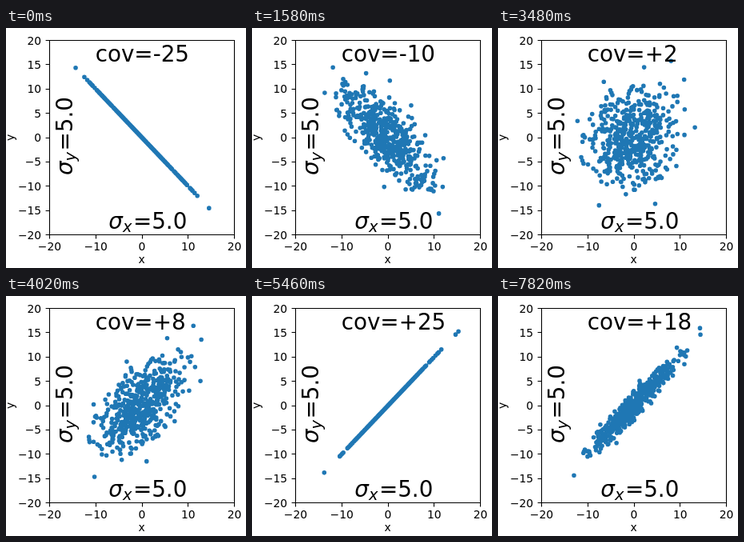
Recreate the animation shown at these times as an HTML page. Size 300 by 300 pixels, loop 8000 ms.

```html
<!DOCTYPE html>
<html lang="en">
<head>
<meta charset="utf-8">
<title>Covariance</title>
<style>
  html, body { margin: 0; width: 100%; height: 100%; overflow: hidden; background: #fff; }
  svg { display: block; width: 100vw; height: 100vh; }
  text { font-family: "DejaVu Sans", sans-serif; font-size: 13.89px; fill: #000; }
  .big text { font-size: 27.78px; }
  .big .sigma { font-style: oblique; }
  .big .sub { font-style: oblique; font-size: 19.45px; }
  .axes { fill: none; stroke: #000; stroke-width: 1.1; }
  #dots { fill: none; stroke: #1f77b4; stroke-width: 5.6; stroke-linecap: round; }
</style>
</head>
<body>
<svg viewBox="0 0 300 300">
  <path id="dots"/>
  <path id="frame" class="axes"/>
  <g id="labels"></g>
  <text x="169.7" y="294" text-anchor="middle">x</text>
  <text transform="translate(9.5 137) rotate(-90)" text-anchor="middle">y</text>
  <g class="big">
    <text id="cov" x="111.7" y="42"></text>
    <g id="sx" transform="translate(128.3 251)"></g>
    <g id="sy" transform="translate(83 184) rotate(-90)"></g>
  </g>
</svg>
<script>
const $ = id => document.getElementById(id);
const LOOP = 8000, STEP = 180, STEPS = 12;
const COUNT = 500, SPREAD = 4.85, INNER = 0.955;
const LEFT = 54.5, RIGHT = 285.5, TOP = 15.5, BOTTOM = 258.5, TICK = 4.9;
const px = x => LEFT + (x + 20) * (RIGHT - LEFT) / 40;
const py = y => BOTTOM - (y + 20) * (BOTTOM - TOP) / 40;
const snap = v => Math.floor(v) + 0.5;

// Axes
let frame = `M${LEFT} ${TOP}H${RIGHT}V${BOTTOM}H${LEFT}Z`, labels = "";
const number = v => String(v).replace("-", "\u2212");
for (let v = -20; v <= 20; v += 5) {
  frame += `M${LEFT} ${snap(py(v))}h${-TICK}`;
  labels += `<text x="44.2" y="${py(v) + 5}" text-anchor="end">${number(v)}</text>`;
  if (v % 10 === 0) {
    frame += `M${snap(px(v))} ${BOTTOM}v${TICK}`;
    labels += `<text x="${px(v)}" y="278.3" text-anchor="middle">${number(v)}</text>`;
  }
}
$("frame").setAttribute("d", frame);
$("labels").innerHTML = labels;

const sigma = sub => `<text class="sigma">σ</text><text class="sub" x="17.6" y="4.4">${sub}</text><text x="30.6">=5.0</text>`;
$("sx").innerHTML = sigma("x");
$("sy").innerHTML = sigma("y");

// Uncorrelated cloud: the farthest points, then a seeded Gaussian core
const points = [
  [6.8, 15.3], [1, 14.5], [10, 11.2], [-7.6, 12.2],
  [-12.7, 4.5], [13.2, 1], [5.8, -14.2], [-6.5, -13.5]
];
let seed = 41;
function random() {
  seed = (seed + 0x6D2B79F5) | 0;
  let n = Math.imul(seed ^ (seed >>> 15), 1 | seed);
  n = (n + Math.imul(n ^ (n >>> 7), 61 | n)) ^ n;
  return ((n ^ (n >>> 14)) >>> 0) / 4294967296;
}
while (points.length < COUNT) {
  const r = SPREAD * Math.sqrt(-2 * Math.log(1 - random() * INNER));
  const a = random() * 2 * Math.PI;
  points.push([r * Math.cos(a), r * Math.sin(a)]);
}

// Sweep position: 0 is cov -25, 12 is cov 0, 24 is cov +25
function sweep(ms) {
  const since = start => ms < start ? 0 : Math.min(STEPS, Math.floor((ms - start) / STEP) + 1);
  return since(500) + since(3480) - since(7460);
}

let shown = -1;
function draw(ms) {
  const k = sweep(ms);
  if (k === shown) return;
  shown = k;
  // Blend each coordinate with the other, keeping both deviations constant
  const mix = k / STEPS - 1;
  const norm = Math.sqrt(1 + mix * mix + 0.1 * mix);
  $("dots").setAttribute("d", points.map(([x, y]) =>
    `M${px((x + mix * y) / norm).toFixed(2)} ${py((y + mix * x) / norm).toFixed(2)}h0`).join(""));
  const cov = Math.trunc(25 * mix);
  $("cov").textContent = "cov=" + (cov > 0 ? "+" : "") + cov;
}

const start = performance.now();
function tick() {
  draw((performance.now() - start) % LOOP);
  requestAnimationFrame(tick);
}
tick();
</script>
</body>
</html>
```
